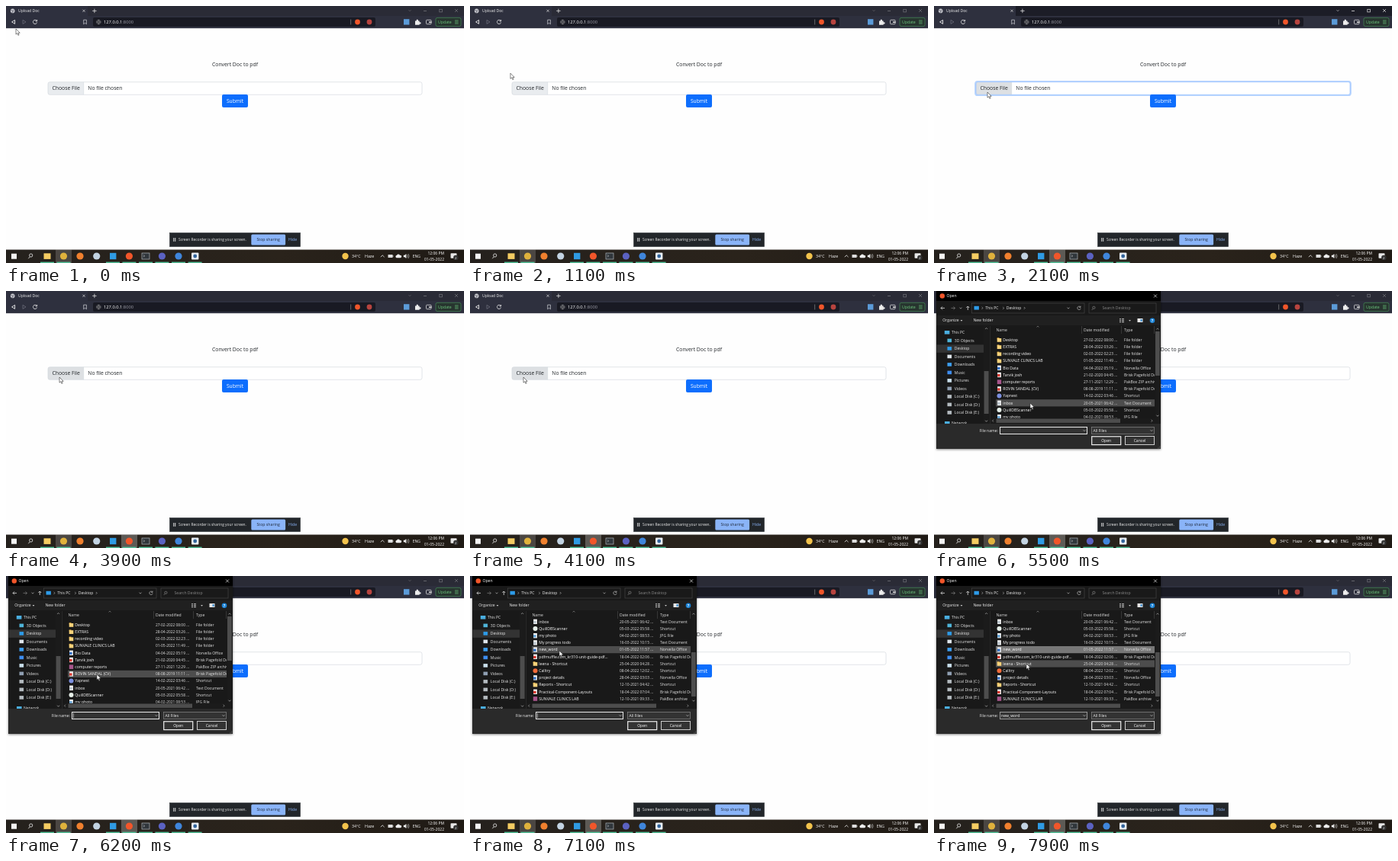
These frames come from a looping animation (600x337 px, 8 s). An HTML page:

```html
<!DOCTYPE html>
<html lang="en">
<head>
<meta charset="utf-8">
<title>Upload Doc</title>
<style>
html, body { margin: 0; width: 100%; height: 100%; overflow: hidden; background: #fefefe; }
#stage { display: block; width: 600px; height: 337px; font-family: "Open Sans", "Noto Sans", sans-serif; }
text { white-space: pre; }
</style>
</head>
<body>
<svg id="stage" viewBox="0 0 600 337"></svg>
<script>
const LOOP = 8000, ROW = 9.2, MAX_SCROLL = 87;
const $ = id => document.getElementById(id);

// Drawing helpers; text is placed by its vertical middle
const rect = (x, y, w, h, fill, more = '') =>
  `<rect x="${x}" y="${y}" width="${w}" height="${h}" fill="${fill}" ${more}/>`;
const dot = (x, y, r, fill, more = '') => `<circle cx="${x}" cy="${y}" r="${r}" fill="${fill}" ${more}/>`;
const text = (x, y, s, fill = '#fff', size = 5.1, more = '') =>
  `<text x="${x}" y="${(y + size * .35).toFixed(2)}" font-size="${size}" fill="${fill}" ${more}>${s}</text>`;
const line = (d, color = '#ddd', w = .8, more = '') =>
  `<path d="${d}" fill="none" stroke="${color}" stroke-width="${w}" ${more}/>`;
const shape = (d, fill) => `<path d="${d}" fill="${fill}"/>`;
const chevron = (x, y, color = '#bbb') => line(`M${x - 1.5} ${y - .8}l1.5 1.6l1.5 -1.6`, color, .7);
const triangle = (x, y) => shape(`M${x - 1.4} ${y - .7}h2.8l-1.4 1.6z`, '#ccc');
const cross = (x, y, r, color) => line(`M${x - r} ${y - r}l${2 * r} ${2 * r}m0 ${-2 * r}l${-2 * r} ${2 * r}`, color, .7);
const group = (id, body, more = '') => `<g id="${id}" ${more}>${body}</g>`;
const clip = (x, y, w, h, body) =>
  `<svg x="${x}" y="${y}" width="${w}" height="${h}" viewBox="${x} ${y} ${w} ${h}">${body}</svg>`;
const page = (x, y, band) => rect(x - 2.4, y - 3.2, 4.8, 6.4, '#f4f4f4') + (band ? rect(x - 2.4, y - 1, 3.4, 3.2, band) : '');
const folder = (x, y) => rect(x - 2.8, y - 2.8, 2.8, 2, '#d9a53a') + rect(x - 2.8, y - 2, 5.6, 4.8, '#f7d27a');
const box = (x, y, w, h, edge, fill = 'none', more = 'stroke-width=".7"') => rect(x, y, w, h, fill, `stroke="${edge}" ${more}`);

const TYPES = {
  F: 'File folder', S: 'Shortcut', T: 'Text Document', J: 'JPG File', W: 'Norvella Office',
  A: 'Brisk Pagefold Document', Z: 'PakBox ZIP archive', R: 'PakBox archive'
};
const BANDS = { W: '#2b6cc4', A: '#d8322a', J: '#5aa0d8', T: '#b9c4cc' };
const FILES = `Desktop|F|27-02-2022 08:00
EXTRAS|F|28-04-2022 03:26
recording video|F|02-03-2022 02:23
SUNVALE CLINICS LAB|F|01-05-2022 11:49
Bio Data|W|04-04-2022 05:19
Tarvik josh|A|21-02-2020 04:45
computer reports|Z|27-11-2021 12:29
ROVIN SANDAL (CV)|A|08-08-2019 11:11
Yapnest|S|14-02-2022 03:46|#7b8fe0
inbox|T|20-05-2021 06:42
QuillDBScanner|S|05-03-2022 05:58|#e6efe9
my photo|J|04-02-2021 08:53
My progress todo|T|16-03-2022 10:15
new_word|W|01-05-2022 11:57
pdfmuffle.com_kr310-unit-guide-pdf...|A|18-04-2022 02:06
leena - Shortcut|S|25-04-2020 04:28
Calltry|S|08-04-2022 12:02|#f26b3a
project details|W|28-04-2022 03:03
Reports - Shortcut|S|12-10-2021 04:42
Practical-Component-Layouts|A|18-04-2022 07:04
SUNVALE CLINICS LAB|R|12-10-2021 09:33`.split('\n').map(s => s.split('|'));
const PICK = 13;

function fileIcon([, kind, , color], y) {
  if (color) return dot(85.5, y, 3, color);
  if (kind == 'F' || kind == 'S') return folder(85.5, y);
  if (kind == 'Z' || kind == 'R') return rect(82.8, y - 2.8, 5.4, 5.6, '#a8558c');
  return page(85.5, y, BANDS[kind]);
}

function browser() {
  const faint = '#d5d6dc';
  const buttons = chevron(529, 6) + line('M547 6.5h4') + box(567.8, 4.3, 3.6, 3.6, '#ddd') + cross(590, 6, 2, '#ddd');
  return rect(0, 0, 600, 14, '#1c1d27', 'id="strip"') + rect(0, 0, 107, 14, '#2e303e') + rect(0, 13, 600, 16.2, '#2e303e') +
    dot(8.7, 6.4, 2.8, '#c9cad0') + line('M6.5 5.5l2.3 1l1.8 -1.5M7.6 8.5l2 -1', '#2e303e', .7) +
    text(16, 6.5, 'Upload Doc', '#eee') + cross(102, 6.3, 1.6, '#ddd') + line('M113.2 6.4h5.4m-2.7 -2.7v5.4', '#ddd') +
    group('buttons', buttons) +
    line('M11.6 18.4v5l-4 -2.5z', '#eee', .9) + line('M22 18.4v5l4 -2.5z', '#6b6d7a') +
    line('M40 19.2a2.6 2.6 0 1 0 .6 2.3M40.6 18v2h-2', '#eee') +
    line('M101.7 18.2h3.7v5.6l-1.85 -1.5l-1.85 1.5z', faint, .7) +
    rect(114, 15, 370, 12, '#191a23', 'rx="2"') +
    line('M121.3 18.2a2.8 2.8 0 1 0 .1 0M118.7 21h5.4M121.4 18.2q-2.5 2.8 0 5.6q2.5 -2.8 0 -5.6', '#aaa', .5) +
    text(128, 21, '127.0.0.1<tspan fill="#9a9ba5">:8000</tspan>', '#fff', 5.75) +
    rect(451.5, 17.5, .6, 7, '#999') + dot(460.5, 21, 3.4, '#f2562a') + dot(476, 21, 3.4, '#b8443f') +
    rect(521, 17.2, 7.4, 7.4, '#5b9bd8') +
    shape('M536 19.5h1.8a1.2 1.2 0 1 1 2 0h1.8v2a1.2 1.2 0 1 1 0 1.8v1.5h-5.6z', '#eee') +
    rect(550.5, 18.3, 6.6, 5.4, 'none', 'stroke="#ddd" stroke-width=".8" rx="1"') + rect(554, 20.4, 3.4, 1.6, '#ddd') +
    rect(563, 15.4, 33, 11.2, '#27352f', 'stroke="#4a9a5c" stroke-width=".6" rx="2"') +
    text(566, 21, 'Update', '#6cc47c', 5.2) + line('M588 19h4.6m0 2h-4.6m0 2h4.6', '#6cc47c', .7);
}

function form() {
  return text(300, 77, 'Convert Doc to pdf', '#212529', 6.85, 'text-anchor="middle"') +
    group('ring', rect(54.1, 98.8, 491.8, 18.4, 'none', 'rx="3" stroke="#0d6efd" stroke-opacity=".3" stroke-width="1.8"')) +
    rect(55, 99.7, 490, 16.6, '#fff', 'rx="2.4"') +
    `<path id="choose" d="M57.4 99.7H101.7V116.3H57.4A2.4 2.4 0 0 1 55 113.9V102.1A2.4 2.4 0 0 1 57.4 99.7Z"/>` +
    rect(101.6, 99.7, .5, 16.6, '#ced4da') +
    rect(55, 99.7, 490, 16.6, 'none', 'id="edge" rx="2.4" stroke-width=".6"') +
    text(60.4, 108, 'Choose File', '#212529', 6.85) + text(107.3, 108, 'No file chosen', '#212529', 6.8) +
    rect(283, 116, 34, 17, '#0d6efd', 'rx="2"') + text(300, 124.7, 'Submit', '#fff', 6.7, 'text-anchor="middle"');
}

function sharingBar() {
  return box(214.5, 297.5, 171, 18, '#3c4043', '#22262a') +
    rect(219.2, 304, 1, 4.8, '#ddd') + rect(221.2, 304, 1, 4.8, '#ddd') +
    text(226, 306.5, 'Screen Recorder is sharing your screen.', '#f0f0f0', 4.85) +
    rect(321.3, 299.4, 44.8, 14, '#8ab4f8', 'rx="1.5"') + text(343.7, 306.5, 'Stop sharing', '#202a3a', 5.2, 'text-anchor="middle"') +
    text(370, 306.5, 'Hide', '#8ab4f8');
}

function taskbar() {
  const icons = [[75.5, '#e0b23c'], [97, '#f0802e'], [118.7, '#c3d3e2'], [161.4, '#f2562a'], [204.4, '#5b62c2'], [226, '#3f86dc']];
  const tasks = [54, 75.5, 140, 161.4, 183, 204.4, 226, 247.6];
  return `<linearGradient id="bar"><stop stop-color="#25211d"/><stop offset=".6" stop-color="#2a231b"/>
    <stop offset="1" stop-color="#1f1a15"/></linearGradient>` +
    rect(0, 319.5, 600, 17.5, 'url(#bar)') + rect(65, 319.5, 21, 17.5, '#fff', 'opacity=".17"') +
    rect(151, 319.5, 21, 17.5, '#fff', 'id="active" opacity=".25"') +
    tasks.map(x => rect(x - 9, 335.6, 18, 1.4, '#52c39a')).join('') +
    rect(7, 324.7, 7, 7, '#f5f5f5') + line('M34.8 327a2.1 2.1 0 1 0 -4.2 0a2.1 2.1 0 1 0 4.2 0M31.3 328.8l-2 2.4', '#eee') +
    rect(49.5, 324.3, 9, 7.6, '#f4cc62') + icons.map(([x, c]) => dot(x, 328, 4.6, c)).join('') +
    rect(136, 323.8, 8.4, 8.4, '#2f9be4') + rect(178, 324, 10, 8, '#30363b', 'stroke="#aeb5ba" stroke-width=".7"') +
    line('M180 326.5l1.6 1.3l-1.6 1.3', '#ddd', .6) +
    rect(243, 323.6, 9.4, 8.8, '#e8eef4', 'rx="1"') + dot(247.7, 328, 2.4, '#33659c') +
    dot(444.5, 328, 4.2, '#f3c34c') + text(453, 328.2, '34°C', '#fff', 5.3) + text(470, 328.2, 'Haze', '#fff', 5.3) +
    line('M490.8 329.2l2.4 -2.4l2.4 2.4', '#eee') + rect(500.5, 326, 6, 4, '#ddd') + rect(506.5, 327, .8, 2, '#ddd') +
    shape('M511.5 330.3a1.9 1.9 0 0 1 .5 -3.6a2.3 2.3 0 0 1 4.2 .2a1.7 1.7 0 0 1 .6 3.4z', '#eee') +
    shape('M520.8 326.8h1.5l2 -1.8v6l-2 -1.8h-1.5z', '#eee') + line('M525.4 326.2q1.4 1.8 0 3.6m1.5 -4.8q2.3 3 0 6', '#ddd', .6) +
    text(532.7, 328.2, 'ENG') + text(574, 324, '12:06 PM', '#fff', 5, 'text-anchor="end"') +
    text(574, 332, '01-05-2022', '#fff', 5, 'text-anchor="end"') +
    rect(582.5, 324.2, 8, 6.6, '#e8e8e8', 'rx=".8"') + dot(589.3, 330, 3.2, '#333') + text(589.3, 330.1, '2', '#fff', 4.2, 'text-anchor="middle"');
}

const chosenRow = y => rect(3.4, y - 5, 61.6, 10.4, '#333');

function quickAccess() {
  const names = ['Downloads', 'Documents', 'Pictures', 'EXTRAS', 'redis', 'static', 'SUNVALE CLINI'];
  return text(23, 58, 'Quick access', '#e8e8e8') + names.map((name, i) => {
    const y = 79 + i * 10.5;
    return page(21, y) + text(26.5, y, name, '#e8e8e8') +
      (i < 3 ? line(`M59 ${y + 2}l1.6 -1.6m-1 -1.2l2.2 2.2m-1.2 -2.4l2.2 2.2`, '#bbb', .7) : '');
  }).join('') + text(23, 156, 'SkyShelf - Person', '#e8e8e8') + chosenRow(170.3) +
    rect(14, 167.6, 7, 4.8, '#4aaee0') + text(23.5, 170, 'This PC', '#e8e8e8');
}

function thisPc() {
  const names = ['3D Objects', 'Desktop', 'Documents', 'Downloads', 'Music', 'Pictures', 'Videos',
    'Local Disk (C:)', 'Local Disk (D:)', 'Local Disk (E:)'];
  const colors = ['#4fb4d8', '#2d9be8', '#dfe6ec', '#3d9ff0', '#3d8df0', '#c9dfec', '#8f9fb2', '#b4bbc0', '#b4bbc0', '#b4bbc0'];
  return rect(13.8, 52, 6.6, 4.6, '#4aaee0') + text(23, 54.4, 'This PC', '#e8e8e8') + chosenRow(75.4) +
    names.map((name, i) => {
      const y = 65 + i * 10.5;
      return rect(17.5, y - 2.4, 5.6, 4.6, colors[i]) + text(26.8, y, name, '#e8e8e8');
    }).join('') + rect(14, 171, 6.6, 4, '#4aaee0') + text(23, 173.4, 'Network', '#e8e8e8');
}

function rows() {
  const list = FILES.map((file, i) => {
    const y = 64 + i * ROW, [name, kind, date] = file;
    return fileIcon(file, y) + (kind == 'F' ? '' : `<g class="blank">${page(85.5, y)}</g>`) +
      text(90.3, y, name, '#fff') + text(196, y, date + ' ...', '#e4e4e4', 4.85) + text(249, y, TYPES[kind], '#e4e4e4');
  }).join('');
  return clip(74, 56.2, 215, 110.5, group('rows',
    rect(81, 0, 208, ROW, '#4d4d4d', 'id="hover"') +
    rect(81, 64 + (PICK - .5) * ROW, 208, ROW, '#777', 'id="picked"') + list));
}

function dialog() {
  const track = '#1b1b1b', thumb = '#4d4d4d';
  const sep = x => rect(x, 46, .5, 10, '#555');
  const frame = rect(3, 0, 294, 207, '#000', 'style="filter:drop-shadow(0 1px 1.5px #0007)"') +
    rect(3, 13, 294, 161, '#191919') + rect(3, 32, 294, 13, '#202020') + rect(3, 174, 294, 33, '#2a2a2a') +
    dot(10.8, 6.5, 3.2, '#f2562a') + text(16.5, 6.7, 'Open') + cross(290, 6.5, 2, '#eee') +
    rect(266.5, 36, 7, 5, '#e8e8e8') + rect(270.5, 37, 2.2, 3, '#3f8fd0') +
    dot(286, 38.7, 3.3, '#1c84d8') + text(286, 38.8, '?', '#fff', 5, 'text-anchor="middle" font-weight="700"') +
    text(81.5, 51, 'Name', '#ddd') + text(196, 51, 'Date modified', '#ddd') + text(249, 51, 'Type', '#ddd') +
    sep(193) + sep(245.5) + sep(288) + line('M134.5 47.4l1.5 -1.4l1.5 1.4', '#999', .6) + rect(73.2, 46, .6, 128, '#333') +
    rect(65, 45.5, 7.5, 128.5, track) + rect(65.6, 105, 6, 56, thumb) +
    line('M67 50l1.6 -1.6l1.6 1.6', '#aaa', .7) + chevron(68.6, 170.5) +
    rect(289.3, 46, 7.2, 121, track) + rect(290, 53, 5.8, 58, thumb, 'id="thumb"') +
    line('M291.4 50.5l1.5 -1.6l1.5 1.6', '#aaa', .7) + chevron(292.9, 163.5) +
    rect(74, 167, 222.5, 6.4, track) + rect(81.5, 167.5, 162.5, 5.4, thumb) +
    line('M78 168.7l-1.5 1.5l1.5 1.5M284.6 168.7l1.5 1.5l-1.5 1.5', '#aaa', .7);
  const blocks = rect(3, 13, 294, 19, '#fff') +
    [[60.5, 179.5, 24, 6.5], [86.3, 177.8, 115, 10.2], [206.3, 177.8, 82.7, 10.2], [206.3, 190.3, 38.7, 11.5],
      [250, 190.3, 39, 11.5], [289, 199.3, 8, 7.7]].map(b => rect(...b, '#fff')).join('');
  const controls = line('M14 22.4h-5m2 -2l-2 2l2 2', '#ddd') + line('M22.5 22.4h5m-2 -2l2 2l-2 2', '#777') + chevron(35, 22.4) +
    line('M44.3 25v-5m-2 2l2 -2l2 2', '#ddd') + box(49.3, 16, 147.7, 13, '#444') +
    rect(52.5, 19.8, 6.4, 4.8, '#2d9be8') + line('M62.6 21l1.4 1.4l-1.4 1.4m27.6 -2.8l1.4 1.4l-1.4 1.4m27.6 -2.8l1.4 1.4l-1.4 1.4', '#bbb', .7) +
    text(67.3, 22.4, 'This PC', '#eee') + text(94.8, 22.4, 'Desktop', '#eee') + chevron(176, 22.4) +
    line('M191.7 20.9a2.2 2.2 0 1 0 .5 1.8M192 19.6v1.8h-1.8', '#bbb', .7) +
    box(203, 16, 88, 13, '#444') + line('M211 21.8a1.6 1.6 0 1 0 -3.2 0a1.6 1.6 0 1 0 3.2 0M208.3 23.2l-1.6 1.8', '#999', .6) +
    text(220.5, 22.4, 'Search Desktop', '#888') +
    text(11.3, 38.7, 'Organize', '#eee') + triangle(36, 38.8) + text(51.5, 38.7, 'New folder', '#eee') +
    line('M243 36.7h2m1 0h3m-6 2h2m1 0h3m-6 2h2m1 0h3', '#ddd', .9) + triangle(256.5, 38.8) +
    text(84, 183, 'File name:', '#eee', 5.1, 'text-anchor="end"') +
    box(86.5, 178.5, 114, 9, '#999', '#333', 'id="field"') + chevron(197, 183) +
    rect(88.2, 179.7, .5, 6.6, '#fff', 'id="caret"') + group('chosen', text(88, 183.2, 'new_word')) +
    box(206.5, 178.5, 82, 9, '#888', '#333') + text(208.5, 183.2, 'All Files', '#eee') + chevron(285, 183) +
    box(206.7, 190.8, 38, 10.8, '#eee', '#333', 'stroke-width="1.2"') + text(225.7, 196.2, 'Open', '#fff', 5.1, 'text-anchor="middle"') +
    box(250.5, 190.5, 38, 11, '#ccc', '#333', '') + text(269.5, 196.2, 'Cancel', '#fff', 5.1, 'text-anchor="middle"') +
    line('M295.8 203.5v2.5h-2.5', '#888', .8, 'stroke-dasharray="1"');
  return group('dialog', frame + rows() +
    group('loading', blocks + clip(3, 45, 62, 129, quickAccess())) +
    group('loaded', controls + clip(3, 45, 62, 129, thisPc())));
}

$('stage').innerHTML = rect(0, 0, 600, 337, '#fefefe') + browser() + form() + sharingBar() + taskbar() + dialog() +
  group('cursor', '<path d="M0 0v7.2l1.7 -1.5l1.2 2.7l1.2 -.5l-1.2 -2.6h2.3z" fill="#fff" stroke="#222" stroke-width=".55"/>');

const PATH = [[0, 13, 30], [400, 13, 30], [1500, 70, 113], [4500, 70, 113], [5300, 126, 147], [5700, 126, 147],
  [6100, 119, 129], [6400, 119, 129], [7100, 117, 98], [7500, 117, 98], [7850, 121, 115], [LOOP, 121, 115]];
const WHEEL = [6500, 6700, 6900, 7050];
const clamp = v => Math.max(0, Math.min(1, v));
const show = (el, on) => el.style.display = on ? '' : 'none';

function pointer(t) {
  const i = PATH.findIndex(p => p[0] > t), [t0, x0, y0] = PATH[i - 1], [t1, x1, y1] = PATH[i];
  const u = (t - t0) / (t1 - t0), e = u * u * (3 - 2 * u);
  return [x0 + (x1 - x0) * e, y0 + (y1 - y0) * e];
}

function draw(t) {
  const [x, y] = pointer(t), open = t >= 4200, loaded = t >= 4600, picked = t >= 7400;
  $('cursor').setAttribute('transform', `translate(${x} ${y})`);

  const focus = Math.min(clamp((t - 1900) / 150), clamp((2750 - t) / 150));
  const active = t >= 1900 && t < 2600;
  $('ring').style.opacity = focus;
  $('edge').setAttribute('stroke', focus > .5 ? '#86b7fe' : '#ced4da');
  $('choose').setAttribute('fill', x > 55 && x < 102 && y > 99.5 && y < 116.5 ? '#dde0e3' : '#e9ecef');
  $('buttons').style.opacity = active ? 1 : .4;
  $('strip').setAttribute('fill', active ? '#1c1d27' : '#2a2b36');
  show($('active'), t >= 1900);

  show($('dialog'), open);
  show($('loading'), !loaded);
  show($('loaded'), loaded);
  document.querySelectorAll('.blank').forEach(el => show(el, !loaded));

  const scroll = Math.min(MAX_SCROLL, WHEEL.filter(w => t >= w).length * 3 * ROW);
  $('rows').setAttribute('transform', `translate(0 ${-scroll})`);
  $('thumb').setAttribute('y', 53 + scroll / MAX_SCROLL * 47);
  const row = Math.round((y + scroll - 64) / ROW);
  $('hover').setAttribute('y', 64 + (row - .5) * ROW);
  show($('hover'), loaded && x > 81);
  show($('picked'), picked);
  show($('chosen'), picked);
  $('field').setAttribute('stroke', picked ? '#999' : '#e8e8e8');
  show($('caret'), !picked && Math.floor((t - 4700) / 530) % 2 == 0);
}

const start = performance.now();
(function tick() {
  draw((performance.now() - start) % LOOP);
  requestAnimationFrame(tick);
})();
</script>
</body>
</html>
```
